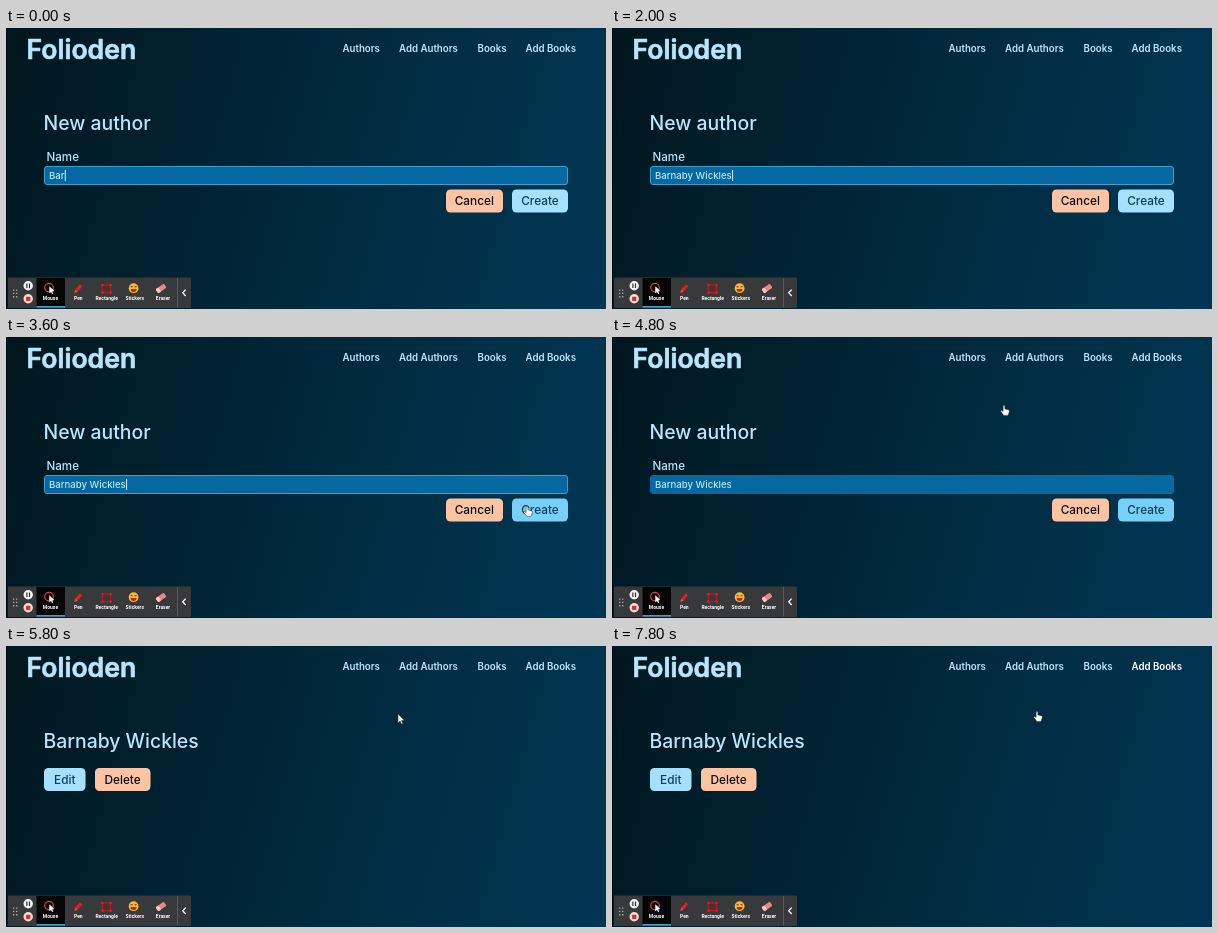
An HTML page for the animation above (8 s loop, 600 by 281 pixels).

```html
<!DOCTYPE html>
<html lang="en">
<head>
<meta charset="utf-8">
<title>New author</title>
<style>
  html, body { margin: 0; width: 100%; height: 100%; overflow: hidden; background: #002536; }
  svg { display: block; width: 100vw; height: 100vh; }
  text { font-family: Inter, "Open Sans", sans-serif; font-weight: 500; fill: #bae6fd; white-space: pre; }
  .logo { font-size: 26.6px; font-weight: 600; stroke: #bae6fd; stroke-width: .7; stroke-linejoin: round; }
  .nav text { font-size: 9.7px; font-weight: 600; }
  .title { font-size: 19.4px; }
  .label { font-size: 11.6px; }
  .value { font-size: 9.6px; }
  .button text { font-size: 11.8px; text-anchor: middle; fill: #0b3f5c; }
  .button.warm text { fill: #0a0a0a; }
  .button rect { fill: #a5e1fd; }
  .button.warm rect { fill: #fdc4a4; }
  .serif text { font-family: "Liberation Serif", serif; font-weight: 400; }
  .serif .title { font-size: 19.2px; }
  .serif .button text { font-size: 12px; }
  .tools text { font: 700 5px Roboto, sans-serif; fill: #fff; text-anchor: middle; }

  /* Every part shares one 8 s clock; 2.5% is one 200 ms step. */
  .step { animation: 8s step-end infinite; }
  #form { animation-name: form; }
  #plain { animation-name: plain; }
  #styled { animation-name: styled; }
  #create rect { animation: create 8s step-end infinite; }
  #border { animation-name: border; }
  #caret { animation-name: blink; }
  #books { animation-name: books; }
  #addBooks { animation-name: addBooks; }
  #pointer { animation-name: move; }
  #hand { animation-name: hand; }
  #arrow { animation-name: arrow; }

  @keyframes form { 0% { opacity: 1 } 62.5%, 100% { opacity: 0 } }
  @keyframes plain { 0% { opacity: 0 } 62.5% { opacity: 1 } 65%, 100% { opacity: 0 } }
  @keyframes styled { 0% { opacity: 0 } 65%, 100% { opacity: 1 } }
  @keyframes create { 0% { fill: #a5e1fd } 40%, 100% { fill: #78cff8 } }
  @keyframes border { 0% { stroke: #3c9dcf } 50%, 100% { stroke: #0869a2 } }
  @keyframes blink {
    0% { opacity: 1 } 27.5% { opacity: 0 } 32.5% { opacity: 1 }
    40% { opacity: 0 } 45% { opacity: 1 } 50%, 100% { opacity: 0 }
  }
  @keyframes books { 0% { fill: #bae6fd } 82.5% { fill: #fff } 85%, 100% { fill: #bae6fd } }
  @keyframes addBooks { 0% { fill: #bae6fd } 87.5%, 100% { fill: #fff } }
  @keyframes move {
    0% { transform: translate(470px, 220px) }
    37.5% { transform: translate(500px, 198px) }
    40% { transform: translate(516px, 178px) }
    42.5% { transform: translate(521px, 169px) }
    52.5% { transform: translate(496px, 145px) }
    55% { transform: translate(440px, 100px) }
    57.5% { transform: translate(402px, 77px) }
    60% { transform: translate(392px, 68px) }
    77.5% { transform: translate(425px, 48px) }
    80% { transform: translate(456px, 30px) }
    82.5% { transform: translate(477px, 18px) }
    85% { transform: translate(508px, 18px) }
    87.5% { transform: translate(538px, 18px) }
    92.5% { transform: translate(490px, 42px) }
    95% { transform: translate(440px, 62px) }
    97.5%, 100% { transform: translate(425px, 65px) }
  }
  @keyframes hand {
    0% { opacity: 0 } 40% { opacity: 1 } 65% { opacity: 0 }
    82.5% { opacity: 1 } 85% { opacity: 0 } 87.5%, 100% { opacity: 1 }
  }
  @keyframes arrow {
    0% { opacity: 0 } 37.5% { opacity: 1 } 40% { opacity: 0 }
    65% { opacity: 1 } 82.5% { opacity: 0 } 85% { opacity: 1 } 87.5%, 100% { opacity: 0 }
  }
</style>
</head>
<body>
<svg viewBox="0 0 600 281" preserveAspectRatio="none">
  <defs>
    <linearGradient id="night" gradientUnits="userSpaceOnUse" x1="0" y1="60" x2="590" y2="220">
      <stop offset="0" stop-color="#001720"/>
      <stop offset=".5" stop-color="#00283b"/>
      <stop offset="1" stop-color="#003653"/>
    </linearGradient>
  </defs>
  <rect width="600" height="281" fill="url(#night)"/>
  <rect width="1" height="281" fill="#000b10"/>

  <text class="logo" x="20.5" y="30.5">Folioden</text>
  <g class="nav">
    <text x="336.5" y="24">Authors</text>
    <text x="393" y="24">Add Authors</text>
    <text x="471.5" y="24" id="books" class="step">Books</text>
    <text x="519.5" y="24" id="addBooks" class="step">Add Books</text>
  </g>

  <g id="form" class="step">
    <text class="title" x="37.5" y="102">New author</text>
    <text class="label" x="40.5" y="133">Name</text>
    <rect id="border" class="step" x="38.5" y="138.5" width="523" height="18" rx="2.5" fill="#0568a0"/>
    <text class="value" id="typed" x="43" y="151"></text>
    <rect id="caret" class="step" y="142" width="1" height="11" fill="#d4effd"/>
    <g class="button warm">
      <rect x="440" y="161.5" width="57" height="23" rx="4.5"/>
      <text x="468.3" y="177">Cancel</text>
    </g>
    <g class="button" id="create">
      <rect x="506" y="161.5" width="56" height="23" rx="4.5"/>
      <text x="534" y="177">Create</text>
    </g>
  </g>

  <g id="plain" class="step serif">
    <text class="title" x="38" y="100">Barnaby Wickles</text>
    <g class="button">
      <rect x="38" y="121.5" width="38.5" height="22.5" rx="4.5"/>
      <text x="57.2" y="136.3">Edit</text>
    </g>
    <g class="button warm">
      <rect x="86" y="121.5" width="49" height="22.5" rx="4.5"/>
      <text x="110.5" y="136.3">Delete</text>
    </g>
  </g>

  <g id="styled" class="step">
    <text class="title" x="37.5" y="102">Barnaby Wickles</text>
    <g class="button">
      <rect x="38" y="122" width="41.5" height="23" rx="4.5"/>
      <text x="58.8" y="138">Edit</text>
    </g>
    <g class="button warm">
      <rect x="89" y="122" width="55.5" height="23" rx="4.5"/>
      <text x="116.6" y="138">Delete</text>
    </g>
  </g>

  <g class="tools">
    <rect x="2" y="249.5" width="183" height="30.5" rx="1" fill="#38393b"/>
    <path d="M7.7 261.5v8M10.7 261.5v8" stroke="#aaa" stroke-width="1.3" stroke-dasharray="1.3 2"/>
    <circle cx="22.2" cy="257.8" r="4.7" fill="#f4f4f4"/>
    <path d="M20.9 255.6v4.4M23.5 255.6v4.4" stroke="#333" stroke-width="1.2"/>
    <circle cx="22.2" cy="270.8" r="4.7" fill="#f6dcda"/>
    <rect x="20.1" y="268.7" width="4.2" height="4.2" rx=".6" fill="#e02b20"/>
    <rect x="30.5" y="250" width="28.5" height="29.5" fill="#050505"/>
    <rect x="30.5" y="278" width="28.5" height="1.7" fill="#3a9fd0"/>
    <circle cx="43" cy="259.6" r="4.3" fill="none" stroke="#e2403a" stroke-width="1.2"/>
    <path d="M43.3 258.3v7l1.7-1.4 1.2 2.2 1.1-.6-1.1-2.1 2.1-.3z" fill="#fff"/>
    <path d="M68.2 265l1.2-3.8 2.6 2.5z" fill="#f04a40"/>
    <path d="M70.5 262.3l4.6-5" stroke="#e81c1c" stroke-width="3.2"/>
    <rect x="96.4" y="257" width="8.2" height="7.6" fill="none" stroke="#c9141b" stroke-width="1.1"/>
    <path d="M95.3 257h2.2M103.5 257h2.2M95.3 264.6h2.2M103.5 264.6h2.2" stroke="#e51c23" stroke-width="2.2"/>
    <circle cx="127.6" cy="260.2" r="4.9" fill="#fbb82e"/>
    <path d="M124.6 258.7h2M128.6 258.7h2" stroke="#593411" stroke-width="1.1"/>
    <path d="M124.6 261h6a3 3 0 0 1-6 0z" fill="#a92d1c"/>
    <g transform="rotate(-36 155 260.5)">
      <rect x="150" y="258" width="10" height="5" rx="1" fill="#e9868c"/>
      <rect x="150" y="258" width="3.5" height="5" rx="1" fill="#f7c5c7"/>
    </g>
    <text x="44.5" y="272.3">Mouse</text>
    <text x="72.3" y="272.3">Pen</text>
    <text x="100.7" y="272.3">Rectangle</text>
    <text x="128.8" y="272.3">Stickers</text>
    <text x="157" y="272.3">Eraser</text>
    <path d="M171.5 250v29.5" stroke="#59595b"/>
    <path d="M179.7 261.6l-3 3.2 3 3.2" fill="none" stroke="#fff" stroke-width="1.3"/>
  </g>

  <g id="pointer" class="step" stroke="#17303f" stroke-width=".5" stroke-linejoin="round" fill="#fff">
    <path id="hand" class="step" d="M-.9 .9q.9-1.3 1.8 0v3l3.4.8q1.2.4 1 1.6l-.7 2.7-.7 1.4h-4l-3-3.8q-.3-1.3.9-1.1l1.3.9z"/>
    <path id="arrow" class="step" d="M0 0v9l2.1-1.9 1.4 3.1 1.4-.6-1.4-3h2.9z"/>
  </g>
</svg>
<script>
  const NAME = "Barnaby Wickles", LOOP = 8000, STEP = 200, TYPING_END = 1600, START = 3;
  const typed = document.getElementById("typed");
  const caret = document.getElementById("caret");

  function draw() {
    const time = Math.floor(performance.now() % LOOP / STEP) * STEP;
    const progress = Math.min(time / TYPING_END, 1);
    const count = START + Math.floor(progress * (NAME.length - START));
    typed.textContent = NAME.slice(0, count);
    caret.setAttribute("x", 43.3 + typed.getComputedTextLength());
    requestAnimationFrame(draw);
  }
  draw();
</script>
</body>
</html>
```
